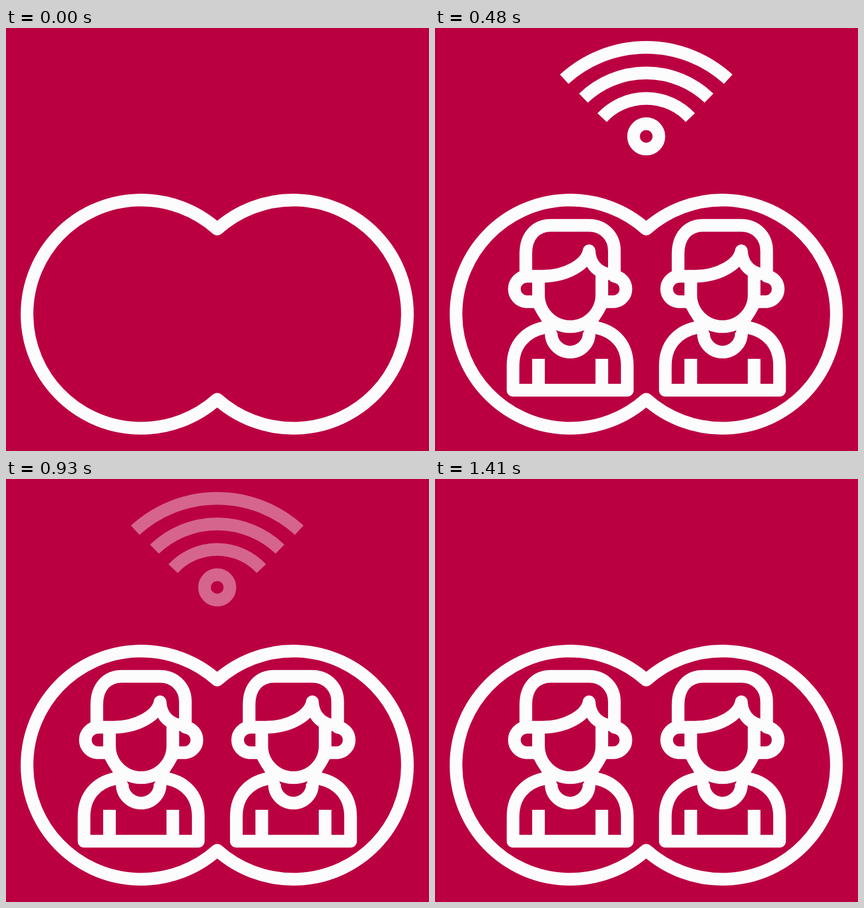
An HTML page for the animation above (1470 ms loop, 748 px wide and 748 px high).

```html
<!DOCTYPE html>
<html lang="en">
<head>
<meta charset="utf-8">
<title>Connected people</title>
<style>
  html, body { margin: 0; width: 100%; height: 100%; overflow: hidden; background: #bb0041; }
  svg { display: block; width: 100vw; height: 100vh; }
  .line { fill: none; stroke: #fcfcfc; stroke-width: 22.4; stroke-linejoin: round; }
  .solid { fill: #fcfcfc; stroke: none; }
  .left, .right, .wifi { opacity: 0; animation: 1470ms step-end infinite; }
  .left { animation-name: left; }
  .right { animation-name: right; }
  .wifi { animation-name: blink; }

  @keyframes left {
    0% { opacity: 0; }
    4.0816% { opacity: 0; animation-timing-function: steps(4); }
    12.2448%, 100% { opacity: 1; }
  }
  @keyframes right {
    0% { opacity: 0; }
    20.4081% { opacity: 0; animation-timing-function: steps(4); }
    28.5714%, 100% { opacity: 1; }
  }
  /* fade in, hold, fade out, stay lit, then restart */
  @keyframes blink {
    0% { opacity: 0; }
    22.4489%, 59.1836% { opacity: 0; animation-timing-function: steps(5); }
    32.6530%, 69.3877% { opacity: 1; }
    38.7755%, 75.5102% { opacity: 1; animation-timing-function: steps(5); }
    48.9795%, 85.7142% { opacity: 0; }
    51.0204%, 87.7551% { opacity: 1; }
    95.9183%, 100% { opacity: 0; }
  }
</style>
</head>
<body>
<svg viewBox="0 0 748 748">
  <defs>
    <g id="person" class="line">
      <!-- hair and ears -->
      <path d="M183 484H161A22.6 22.6 0 0 1 160.6 439V399C160.6 368 178 349 205 349H272C298 349 317.2 368 317.2 394V439A22.6 22.6 0 0 1 317 484H295"/>
      <!-- fringe -->
      <path stroke-linecap="round" d="M161 439H190C232 439 268 418 272.5 394Q274 426 304 435"/>
      <!-- face -->
      <path d="M183 439V472A56 56 0 0 0 295 472V432"/>
      <!-- neck and collar -->
      <path class="solid" d="M174 488V494L189 519L194 541H217L205 515L185 488ZM304 488V494L289 519L284 541H261L273 515L293 488Z"/>
      <path d="M205.4 539.5A33.6 33.6 0 0 0 272.6 539.5"/>
      <!-- body and arms -->
      <path d="M192 530C160 537 138 560 138 597V640.5H340V597C340 560 318 537 286 530"/>
      <path d="M183 585V635M295 585V635"/>
    </g>
  </defs>

  <path class="line" d="M373.5 355.6A201.8 201.8 0 1 0 373.5 656.4A201.8 201.8 0 1 0 373.5 355.6Z"/>
  <g class="left"><use href="#person"/></g>
  <g class="right"><use href="#person" x="269.3"/></g>
  <g class="wifi line">
    <circle cx="373.5" cy="191.7" r="22.4"/>
    <path d="M295.5 158.5A106.5 106.5 0 0 1 451.5 158.5"/>
    <path d="M262.5 124A160.7 160.7 0 0 1 484.5 124"/>
    <path d="M228.5 90.5A214.9 214.9 0 0 1 518.5 90.5"/>
  </g>
</svg>
</body>
</html>
```
